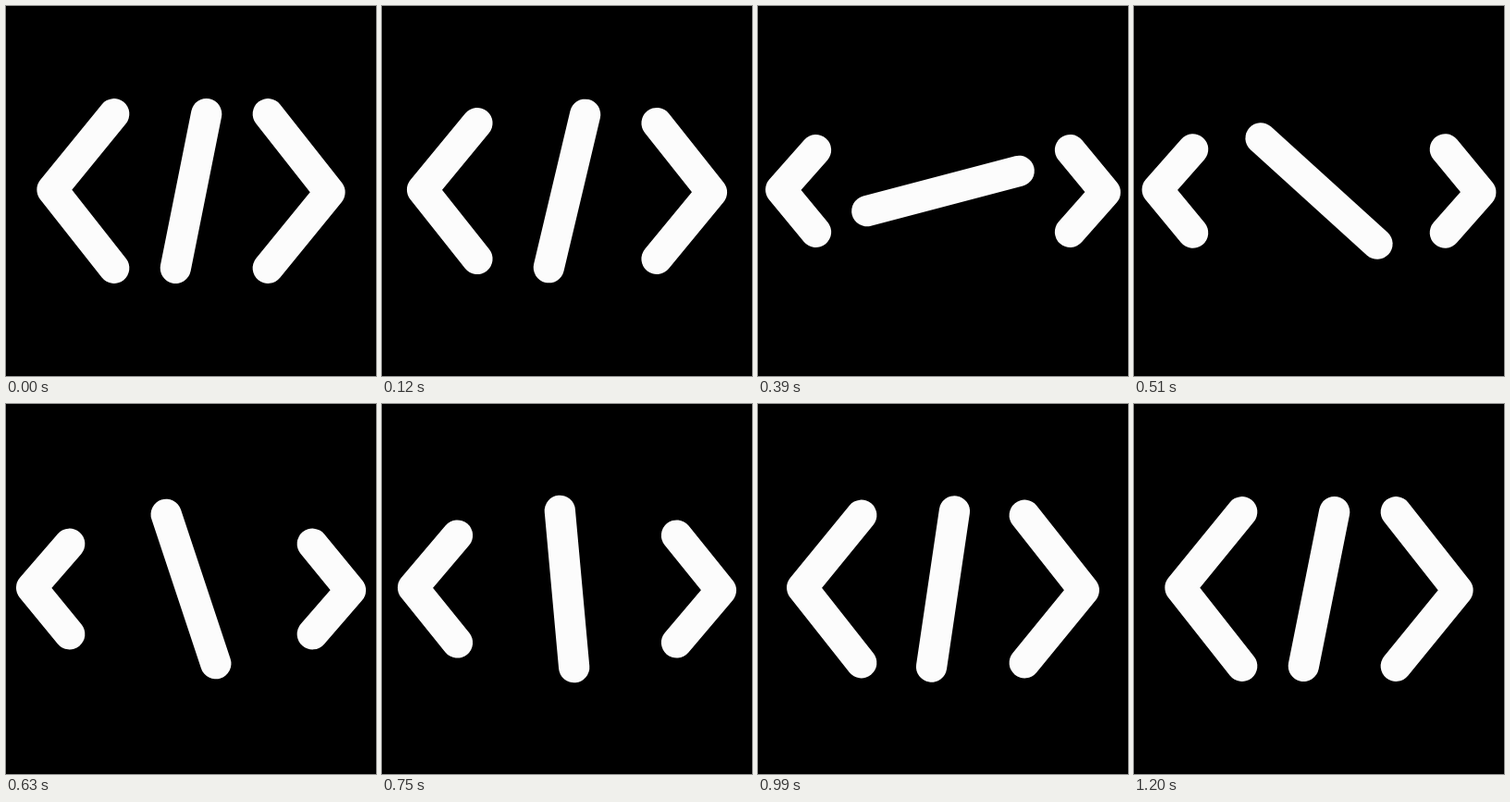
An HTML page with a canvas for the animation above (1.26 s loop, 400 by 400 pixels).

```html
<!DOCTYPE html>
<html lang="en">
<head>
<meta charset="utf-8">
<title>Code icon</title>
<style>
  html, body { margin: 0; width: 100%; height: 100%; overflow: hidden; background: #000; }
  canvas { display: block; width: 400px; height: 400px; }
</style>
</head>
<body>
<canvas id="stage" width="400" height="400"></canvas>
<script>
const ctx = document.getElementById("stage").getContext("2d");
const LOOP = 1260, STEP = 30, PEAK = 400, END = 1200;
const mix = (a, b, p) => a + (b - a) * p;

// Ease with control points (x1, 0) and (x2, 1).
function ease(x1, x2) {
  return x => {
    if (x <= 0) return 0;
    if (x >= 1) return 1;
    let lo = 0, hi = 1, s = 0.5;
    for (let i = 0; i < 30; i++) {
      s = (lo + hi) / 2;
      const r = 1 - s;
      if (3 * r * r * s * x1 + 3 * r * s * s * x2 + s * s * s < x) lo = s;
      else hi = s;
    }
    return s * s * (3 - 2 * s);
  };
}
const spread = ease(0.57, 0.05);
const gather = ease(0.6, 0.4);

// Slash rotation: [ms, degrees, degrees per ms]
const TURN = [
  [0, 0, 0], [210, 8.7, 0.11], [390, 63.9, 0.58], [510, 120.9, 0.36],
  [750, 163.5, 0.09], [990, 177.1, 0.03], [1200, 180, 0]
];

function turnAt(t) {
  const i = Math.max(1, TURN.findIndex(key => key[0] >= t));
  const [t0, a0, v0] = TURN[i - 1], [t1, a1, v1] = TURN[i];
  const d = t1 - t0, s = (t - t0) / d, r = 1 - s;
  return a0 * r * r * (1 + 2 * s) + a1 * s * s * (3 - 2 * s)
    + d * s * r * (v0 * r - v1 * s);
}

function stroke(...points) {
  ctx.beginPath();
  points.forEach(([x, y]) => ctx.lineTo(x, y));
  ctx.stroke();
}

function draw(t) {
  const p = t < PEAK ? spread(t / PEAK) : 1 - gather((t - PEAK) / (END - PEAK));
  const tip = mix(150, 175.3, p);
  const endX = mix(83.3, 137.5, p);
  const endY = mix(83.3, 44.3, p);
  const angle = Math.atan(0.2) + turnAt(t) * Math.PI / 180;
  const x = 85 * Math.sin(angle), y = -85 * Math.cos(angle);

  ctx.setTransform(1, 0, 0, 1, 0, 0);
  ctx.fillStyle = "#000";
  ctx.fillRect(0, 0, 400, 400);
  ctx.translate(200, 200);
  ctx.strokeStyle = "#fcfcfc";
  ctx.lineWidth = 33.3;
  ctx.lineCap = ctx.lineJoin = "round";
  for (const side of [-1, 1]) {
    stroke([side * endX, -endY], [side * tip, side * 1.4], [side * endX, endY]);
  }
  stroke([x, y], [-x, -y]);
}

function tick() {
  const t = performance.now() % LOOP;
  draw(Math.min(END, Math.floor(t / STEP) * STEP));
  requestAnimationFrame(tick);
}
tick();
</script>
</body>
</html>
```
